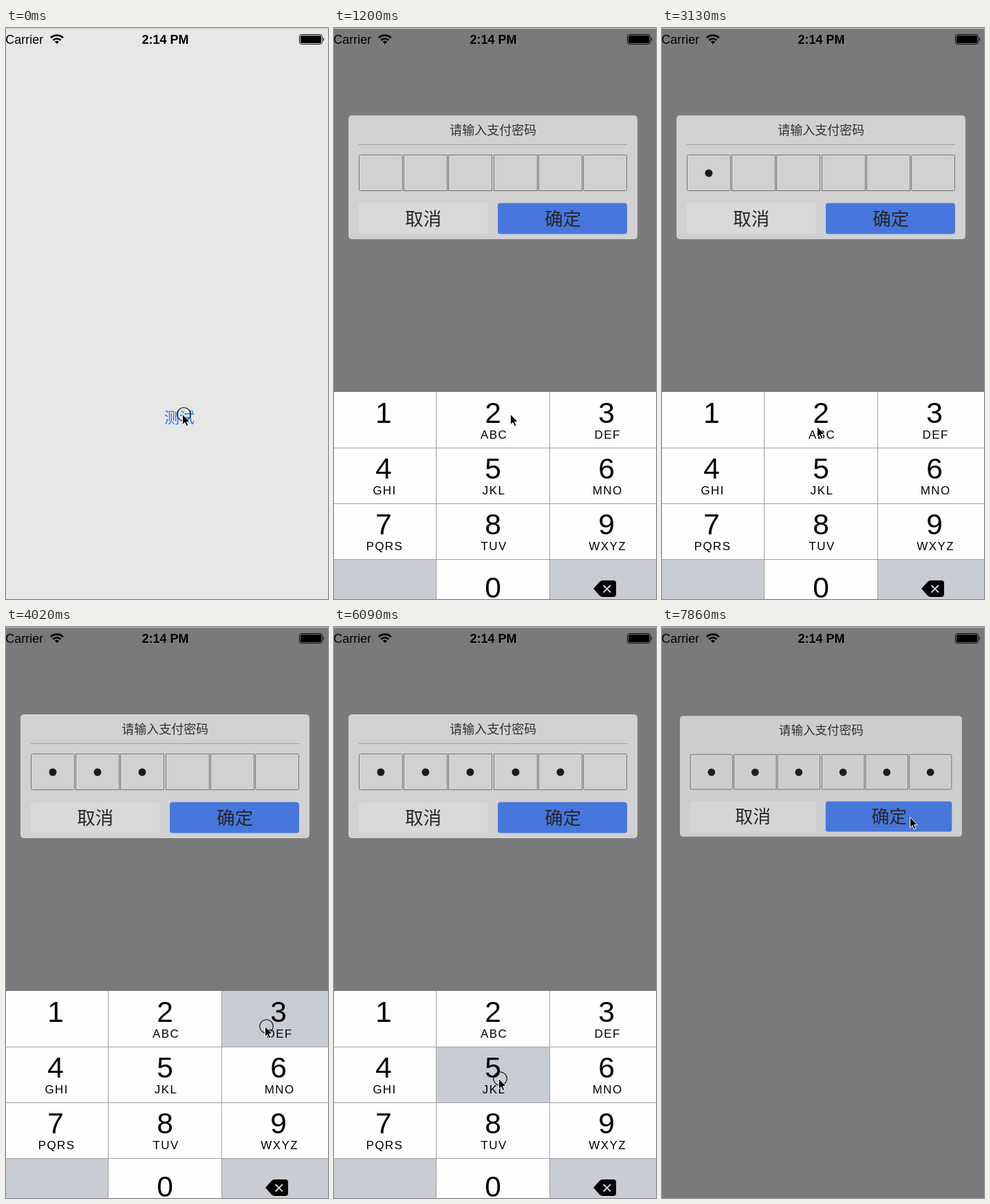
Animation, 468 px wide and 830 px high, one loop 8000 ms. Source, as an HTML page:

```html
<!DOCTYPE html>
<html lang="zh-CN">
<head>
<meta charset="utf-8">
<title>Payment password</title>
<style>
  html, body { margin: 0; width: 100%; height: 100%; overflow: hidden; background: #e7e7e7; }
  svg { display: block; width: 468px; height: 830px; }
  text { font-family: "Liberation Sans", Arial, sans-serif; }
  .cn { font-family: "Noto Sans CJK SC", "Noto Sans CJK", sans-serif; text-anchor: middle; }
  .status { font-size: 18px; }
  .digit { font-size: 42.5px; text-anchor: middle; }
  .letters { font-size: 17px; letter-spacing: 1.4px; text-anchor: middle; }
</style>
</head>
<body>
<svg viewBox="0 0 468 830" xmlns="http://www.w3.org/2000/svg">
  <rect width="468" height="830" fill="#e7e7e7"/>
  <text class="cn" x="252" y="573.5" font-size="22" fill="#0f7cf8">测试</text>
  <rect id="shade" width="468" height="830" fill="#7a7a7c"/>

  <path d="M0 .5H468" stroke="#c7c7c7"/>
  <text class="status" x="-.7" y="23">Carrier</text>
  <path d="M65 14.2A13 13 0 0 1 83 14.2M68.4 17.8A8 8 0 0 1 79.6 17.8" fill="none" stroke="#000" stroke-width="2.7"/>
  <path d="M74 23.2L70.9 20A4.4 4.4 0 0 1 77.1 20Z"/>
  <text class="status" x="197.5" y="23" font-weight="bold">2:14 PM</text>
  <rect x="426.5" y="9.5" width="33" height="14" rx="3" fill="none" stroke="#000"/>
  <rect x="428" y="11" width="30" height="11" rx="1.5"/>
  <path d="M461 13.5Q463.5 16.5 461 19.5Z"/>

  <g id="dialog">
    <rect x="21" y="127" width="420" height="180" rx="5" fill="#d1d1d1"/>
    <text class="cn" x="231.3" y="154.8" font-size="18" fill="#303030">请输入支付密码</text>
    <path id="rule" d="M36 169.5H426" stroke="#9d9d9d"/>
    <g id="cells" fill="none" stroke="#737373"></g>
    <rect x="36" y="254.5" width="187.5" height="45" rx="4" fill="#d9d9d9"/>
    <rect x="238" y="254.5" width="188" height="45" rx="4" fill="#4777dc"/>
    <g font-size="26.5" fill="#262626">
      <text class="cn" x="129.8" y="286.5">取消</text>
      <text class="cn" x="332.8" y="286.5">确定</text>
    </g>
  </g>

  <g id="keyboard"></g>

  <g id="cursor">
    <circle id="ring" cx="1.5" cy=".5" r="9.8" fill="none" stroke="#000" stroke-width="1.1"/>
    <path d="M-.5 .5V15.7L3 12.5L5.5 18.1L8 17L5.5 11.6H10.2Z" stroke="#fff"/>
  </g>
</svg>
<script>
const LOOP = 8000;
const TICK = 148.2; // the picture advances once per tick
const KEY = 81, KB_TOP = 529, KB_HIDDEN = 853;
const GRAY = '#c8ccd3', WHITE = '#fefefe';

const HOME = [257, 561];
// Cursor moves: first tick, last tick, x, y
const MOVES = [
  [13, 15, 80, 579], [19, 21, 226, 579], [24, 26, 377, 580], [28, 34, 97, 645],
  [38, 40, 240, 656], [44, 45, 378, 659], [47, 51, 361, 276]
];
// Tick of each press; the digits 1 to 6 come between the two buttons
const PRESSES = [0, 18, 23, 27, 37, 41, 46, 52];

const $ = id => document.getElementById(id);

function add(parent, tag, attrs, text = '') {
  const el = document.createElementNS('http://www.w3.org/2000/svg', tag);
  for (const k in attrs) el.setAttribute(k, attrs[k]);
  el.textContent = text;
  parent.append(el);
  return el;
}

const dots = [];
for (let i = 0; i < 6; i++) {
  const x = Math.round(36 + 65.2 * i) + 0.5;
  add($('cells'), 'rect', { x, y: 184.5, width: 63, height: 52, rx: i % 5 ? 0 : 2 });
  dots.push(add($('cells'), 'circle', { cx: x + 31.5, cy: 211, r: 5.5, fill: '#1c1c1c', stroke: 'none' }));
}

const kb = $('keyboard');
const letters = ' ABC DEF GHI JKL MNO PQRS TUV WXYZ'.split(' ');
const keys = ['1', '2', '3', '4', '5', '6', '7', '8', '9', '', '0', ''].map((digit, i) => {
  const col = i % 3, y = Math.floor(i / 3) * KEY;
  const cx = 72 + 162 * col - (col === 1 ? 3 : 0);
  const key = add(kb, 'rect', {
    x: col ? 148 + 166 * (col - 1) : 0, y, width: 166, height: KEY, fill: digit ? WHITE : GRAY
  });
  add(kb, 'text', { class: 'digit', x: cx, y: y + (i < 9 ? 44.5 : 55.5) }, digit);
  add(kb, 'text', { class: 'letters', x: cx + 1.6, y: y + 68 }, letters[i]);
  return key;
});
add(kb, 'path', {
  d: 'M148.5 0V324M313.5 0V324M0 81.5H468M0 162.5H468M0 243.5H468',
  stroke: '#a0a1a3', fill: 'none'
});
add(kb, 'path', { d: 'M377 286L386 276Q388 274 391 274H406Q410 274 410 278V294Q410 298 406 298H391Q388 298 386 296Z' });
add(kb, 'path', { d: 'M391.5 281L402 291.5M402 281L391.5 291.5', stroke: GRAY, 'stroke-width': 2 });

const clamp = v => Math.min(1, Math.max(0, v));
const easeOut = v => 1 - (1 - clamp(v)) ** 2;
const easeInOut = v => (1 - Math.cos(Math.PI * clamp(v))) / 2;
const spring = ms => {
  const w = Math.max(0, ms) * Math.sqrt(1000 / 3) / 1000;
  return 1 - Math.exp(-w) * (1 + w);
};

function cursorAt(tick) {
  let [x, y] = HOME;
  for (const [from, to, toX, toY] of MOVES) {
    const p = easeOut((tick - from) / (to - from));
    x += (toX - x) * p;
    y += (toY - y) * p;
  }
  return [x, y];
}

function draw(now) {
  const tick = Math.floor(now % LOOP / TICK);
  const t = tick * TICK;

  $('shade').setAttribute('opacity', clamp((tick - 2) / 2));

  const lift = spring(t - 651) - spring(t - 6945);
  const top = KB_HIDDEN - (KB_HIDDEN - KB_TOP) * lift;
  kb.setAttribute('transform', `translate(0 ${Math.round(top)})`);

  const p = easeInOut((t - 654) / 300) - easeInOut((t - 7825) / 300);
  $('dialog').setAttribute('transform', `translate(231 217) scale(${p}) translate(-231 -217)`);
  $('dialog').setAttribute('opacity', p);
  $('rule').setAttribute('opacity', p < 1 ? 0 : 1);

  dots.forEach((dot, i) => {
    const at = PRESSES[i + 1];
    dot.setAttribute('opacity', tick >= at ? 1 : 0);
    keys[i].setAttribute('fill', tick === at ? GRAY : WHITE);
  });

  $('cursor').setAttribute('transform', `translate(${cursorAt(tick)})`);
  $('ring').setAttribute('opacity', PRESSES.includes(tick) ? 1 : 0);
}

const start = performance.now();
function run() {
  draw(performance.now() - start);
  requestAnimationFrame(run);
}
run();
</script>
</body>
</html>
```
